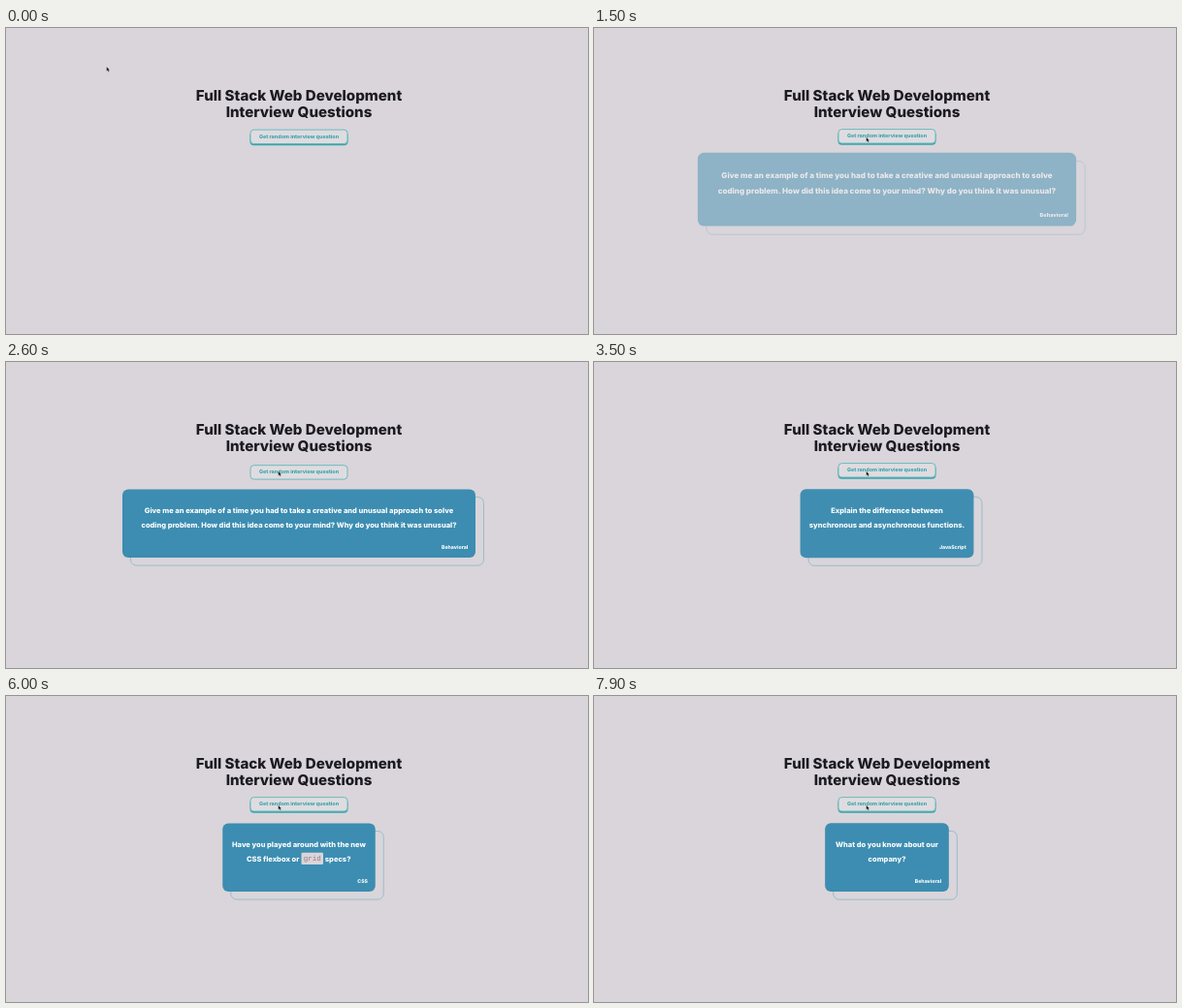
An HTML page for the animation above (8 s loop, 600 by 316 pixels).

```html
<!DOCTYPE html>
<html lang="en">
<head>
<meta charset="utf-8">
<title>Interview Questions</title>
<style>
  html, body { margin: 0; width: 100%; height: 100%; overflow: hidden; background: #d9d5da; }
  svg { display: block; width: 100vw; height: 100vh; }
  text { font-family: Inter, Roboto, sans-serif; font-weight: 800; text-anchor: middle; text-rendering: geometricPrecision; }
  .title { font-size: 15.1px; fill: #1d1b22; }
  .label { font-size: 5.4px; fill: #3ba4ab; }
  .line { font-size: 7.5px; fill: #fff; }
  .topic { font-size: 5.2px; fill: #fff; text-anchor: end; }
  .code { font: 400 7.5px "Liberation Mono", "DejaVu Sans Mono", monospace; fill: #96787f; }
</style>
</head>
<body>
<svg viewBox="0 0 600 316">
  <rect width="600" height="316" fill="#d9d5da"/>
  <text class="title" x="302" y="74.6">Full Stack Web Development</text>
  <text class="title" x="302" y="92">Interview Questions</text>
  <g id="button">
    <rect id="shade" x="251.5" y="107" width="101" height="14.2" rx="4" fill="#3ba4ab"/>
    <rect x="252" y="105.1" width="100" height="14.4" rx="3.6" fill="#dfdce0" stroke="#5fb6bb" stroke-width=".9"/>
    <text class="label" x="302" y="113.8">Get random interview question</text>
  </g>
  <g id="cards"></g>
  <path id="cursor" d="M0 0V4.6L1.1 3.7L1.9 5.4L2.7 5L2 3.4H3.3Z" fill="#111" stroke="#eee" stroke-width=".25"/>
</svg>
<script>
const LOOP = 8000, ENTER = 1000, CX = 302, CY = 166.7;
const byId = id => document.getElementById(id);

const textLine = (x, y, words, anchor = "middle") =>
  `<text class="line" x="${x}" y="${y}" style="text-anchor:${anchor}">${words}</text>`;
const lines = (first, second) => textLine(CX, 155.7, first) + textLine(CX, 170.6, second);

const cards = [
  { start: 1220, width: 364, topic: "Behavioral", body: lines(
    "Give me an example of a time you had to take a creative and unusual approach to solve",
    "coding problem. How did this idea come to your mind? Why do you think it was unusual?") },
  { start: 2700, width: 178, topic: "JavaScript", body: lines(
    "Explain the difference between", "synchronous and asynchronous functions.") },
  { start: 4500, width: 157.5, topic: "CSS", body:
    textLine(CX, 155.7, "Have you played around with the new") +
    textLine(302.3, 170.6, "CSS flexbox or", "end") +
    '<rect x="304.5" y="161.7" width="22.5" height="12.2" rx="1.2" fill="#d9d5da"/>' +
    '<text class="code" x="315.8" y="170.3">grid</text>' +
    textLine(328.8, 170.6, "specs?", "start") },
  { start: 7000, width: 127.5, topic: "Behavioral", body: lines(
    "What do you know about our", "company?") }
];

byId("cards").innerHTML = cards.map(({ width, topic, body }) => {
  const left = CX - width / 2;
  const box = `width="${width}" height="70.6" rx="6"`;
  return `<g>
    <rect x="${left + 8.5}" y="139.5" ${box} fill="none" stroke="#8db5c9" stroke-width=".8"/>
    <rect x="${left}" y="131.4" ${box} fill="#3c8db1"/>
    ${body}<text class="topic" x="${left + width - 7.7}" y="193.2">${topic}</text></g>`;
}).join("");
const cardNodes = [...byId("cards").children];

const clamp = v => Math.min(1, Math.max(0, v));
const bezier = (a, b, s) => 3 * a * s * (1 - s) ** 2 + 3 * b * s * s * (1 - s) + s ** 3;

// The CSS "ease" curve, solved by bisection.
function ease(p) {
  let low = 0, high = 1;
  for (let i = 0; i < 20; i++) {
    const mid = (low + high) / 2;
    if (bezier(0.25, 0.25, mid) < p) low = mid; else high = mid;
  }
  return bezier(0.1, 1, low);
}

function drawCursor(t) {
  const p = clamp((t - 100) / 750);
  const m = p * p * (3 - 2 * p);
  byId("cursor").setAttribute("transform", `translate(${103.7 + 177 * m} ${40 + 72.8 * m})`);
}

function drawButton(t) {
  const pressed = cards.some(c => t >= c.start - 150 && t < c.start);
  const lift = pressed ? 1.6 : t > 800 ? -0.5 : 0;
  byId("button").setAttribute("transform", `translate(0 ${lift})`);
  byId("shade").style.display = pressed ? "none" : "";
}

function drawCards(t) {
  cards.forEach((card, i) => {
    const end = i + 1 < cards.length ? cards[i + 1].start : LOOP;
    const shown = t >= card.start && t < end;
    const e = ease(clamp((t - card.start) / ENTER));
    // Cards start a fifth larger, but never more than 50 units wider.
    const scale = 1 + Math.min(0.2, 50 / card.width) * (1 - e);
    cardNodes[i].setAttribute("opacity", shown && e > 0.2 ? e : 0);
    cardNodes[i].setAttribute("transform",
      `translate(${CX} ${CY}) scale(${scale}) translate(${-CX} ${-CY})`);
  });
}

const origin = performance.now();
function render(now) {
  const t = Math.max(0, now - origin) % LOOP;
  drawCursor(t);
  drawButton(t);
  drawCards(t);
  requestAnimationFrame(render);
}
render(origin);
</script>
</body>
</html>
```
